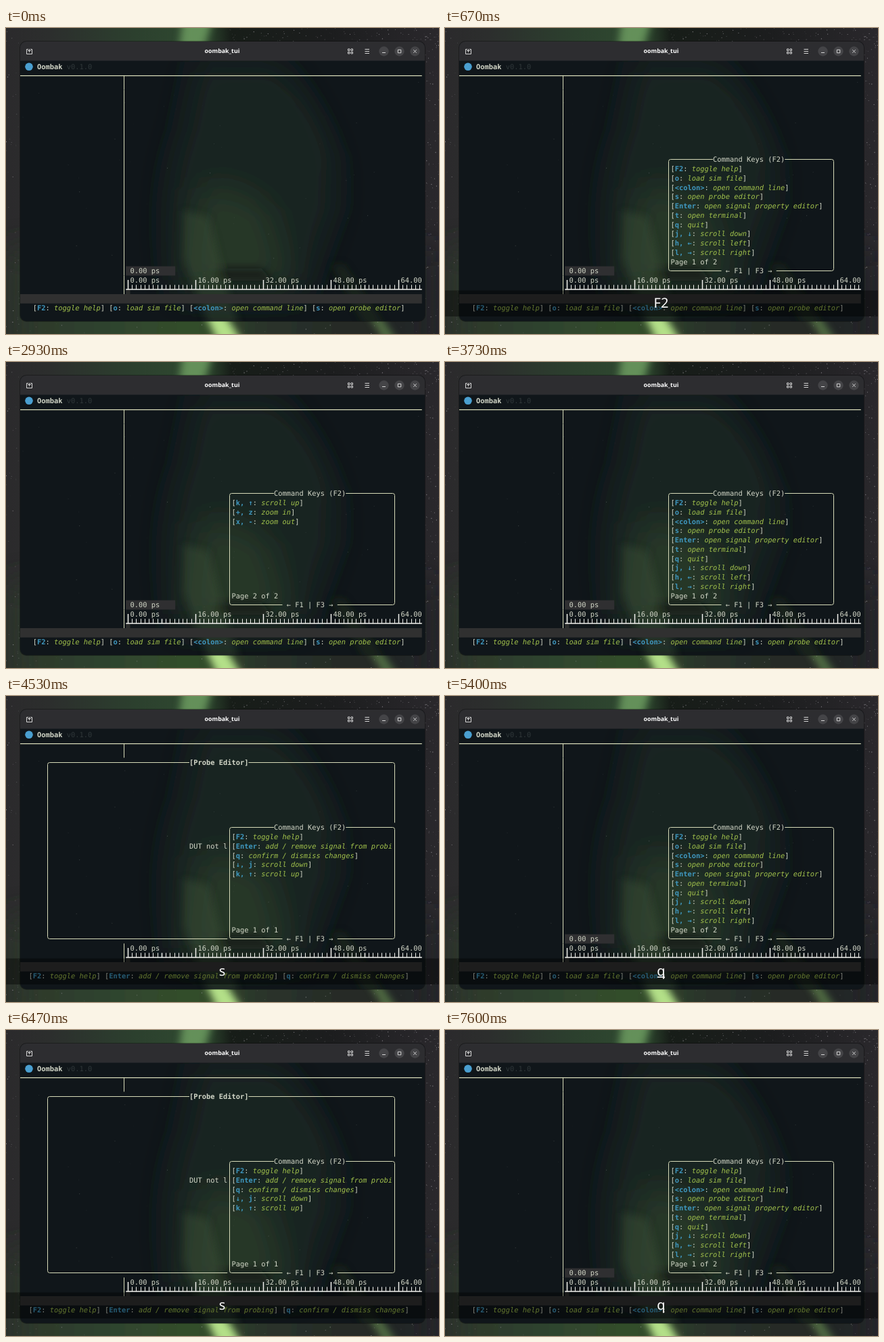
These frames come from a looping animation (640 px wide and 453 px high, 8000 ms). An HTML page:

```html
<!DOCTYPE html>
<html lang="en">
<head>
<meta charset="utf-8">
<title>Waveform viewer help</title>
<style>
html, body { margin: 0; width: 100%; height: 100%; overflow: hidden; background: #1a1c1c; }
svg { display: block; width: 640px; height: 453px; }
text { white-space: pre; text-rendering: geometricPrecision; }
.term text { font: 10.38px "DejaVu Sans Mono", "Noto Sans Mono", monospace; fill: #d3d7c8; }
.term .bold { font-weight: 700; }
.term .key { font-weight: 700; fill: #3f98c0; }
.term .desc { font-style: italic; fill: #a2c24c; }
.line { fill: none; stroke: #d6dab8; stroke-width: 1; }
.tick { fill: none; stroke: #f2f2ee; stroke-width: 1; }
.icon { fill: none; stroke: #d6d6d6; stroke-width: 1; }
.title { font: 700 8.8px "Open Sans", "Noto Sans", sans-serif; fill: #fff; text-anchor: middle; }
.press { font: 20px "Noto Sans", "Open Sans", sans-serif; fill: #fff; text-anchor: middle; }
</style>
</head>
<body>
<svg viewBox="0 0 640 453">
  <defs>
    <linearGradient id="sky">
      <stop offset="0" stop-color="#2b2a2c"/>
      <stop offset=".1" stop-color="#2c2e2d"/>
      <stop offset=".3" stop-color="#2c402e"/>
      <stop offset=".46" stop-color="#2f4a30"/>
      <stop offset=".52" stop-color="#171d18"/>
      <stop offset=".75" stop-color="#1c1d1e"/>
      <stop offset="1" stop-color="#2a282c"/>
    </linearGradient>
    <linearGradient id="ground">
      <stop offset="0" stop-color="#2c352c"/>
      <stop offset=".25" stop-color="#2f442d"/>
      <stop offset=".45" stop-color="#33502c"/>
      <stop offset=".58" stop-color="#2a332a"/>
      <stop offset="1" stop-color="#222325"/>
    </linearGradient>
    <filter id="soft" x="-50%" y="-50%" width="200%" height="200%"><feGaussianBlur stdDeviation="6"/></filter>
    <filter id="haze" x="-60%" y="-60%" width="220%" height="220%"><feGaussianBlur stdDeviation="24"/></filter>
    <clipPath id="frame"><rect x="21" y="20" width="598" height="414" rx="9"/></clipPath>
  </defs>

  <!-- night sky -->
  <rect width="640" height="453" fill="url(#sky)"/>
  <rect y="330" width="640" height="180" fill="url(#ground)" filter="url(#haze)"/>
  <path d="M262 -20H308L292 30H256Z" fill="#76a868" filter="url(#soft)" opacity=".75"/>
  <path d="M290 415H318L356 475H318Z" fill="#b4e088" filter="url(#soft)"/>
  <path d="M528 410L550 420 582 470H562Z" fill="#648a50" filter="url(#soft)" opacity=".7"/>
  <g id="stars" fill="#aaa6ac"></g>

  <!-- window -->
  <rect x="20" y="19" width="600" height="416" rx="10" fill="#000" opacity=".35"/>
  <g clip-path="url(#frame)">
    <rect x="21" y="20" width="598" height="414" fill="#10161a"/>
    <g filter="url(#haze)">
      <path d="M280 50H400Q480 130 490 260L440 400H250Q220 260 260 150Z" fill="#1b2922" opacity=".65"/>
      <path d="M285 240Q330 220 390 270L420 380H265Z" fill="#2b412b" opacity=".7"/>
      <path d="M400 90Q460 130 490 210L470 220Q440 140 390 110Z" fill="#22352a" opacity=".5"/>
    </g>
    <g filter="url(#soft)">
      <path d="M312 356H378L395 374H305Z" fill="#0d130f" opacity=".6"/>
      <path d="M262 270L300 280 325 380 345 440H300L262 340Z" fill="#42593c" opacity=".35"/>
      <path d="M480 350L530 440H560L500 350Z" fill="#2a3f27" opacity=".3"/>
    </g>
    <g id="dimStars" fill="#545a5a"></g>
    <rect x="21" y="20" width="598" height="28.5" fill="#2d2d30"/>
  </g>
  <text class="title" x="319.5" y="37.4">oombak_tui</text>
  <g class="icon">
    <path d="M33 31.5H30.5V38.5H38.5V31.5H36M34.5 31V36M32 33.5H37"/>
    <path d="M505.5 31h2.5v2.5h-2.5zM510 31h2.5v2.5h-2.5zM505.5 35.5h2.5v2.5h-2.5zM510 35.5h2.5v2.5h-2.5z"/>
    <path d="M530.5 31.5h6.5M530.5 34.5h6.5M530.5 37.5h6.5"/>
    <g fill="#444447" stroke="none">
      <circle cx="558.5" cy="34.5" r="7.2"/><circle cx="581.5" cy="34.5" r="7.2"/><circle cx="604.5" cy="34.5" r="7.2"/>
    </g>
    <path d="M556 36.5h5M579.3 32.3h4.5v4.5h-4.5zM602.3 32.3l4.4 4.4M606.7 32.3l-4.4 4.4"/>
  </g>

  <g class="term" id="term"></g>

  <!-- pressed key display -->
  <g id="band">
    <rect y="388.5" width="640" height="38.5" opacity=".4"/>
    <text class="press" id="press" x="319.5" y="414"></text>
    <rect id="under" y="415.4" height="1.5" fill="#fff"/>
  </g>
</svg>
<script>
const LOOP = 8000, COLS = 95, CELL = 6.25, ROW = 13.75;
const NS = "http://www.w3.org/2000/svg";
const $ = id => document.getElementById(id);
const crisp = v => Math.floor(v) + 0.5;
const colX = c => 21 + c * CELL;
const rowY = r => 57 + r * ROW;
const midX = c => crisp(colX(c) + CELL / 2);
const midY = r => crisp(rowY(r));

function add(parent, tag, attrs = {}, content) {
  const el = document.createElementNS(NS, tag);
  for (const k in attrs) el.setAttribute(k, attrs[k]);
  if (content !== undefined) el.textContent = content;
  parent.append(el);
  return el;
}
const group = () => add($("term"), "g");
const put = (g, col, row, str, cls = "") =>
  add(g, "text", { x: colX(col), y: rowY(row) + 3.8, class: cls }, str);
const stroke = (g, d, cls = "line", width) =>
  add(g, "path", { d, class: cls, ...(width && { style: `stroke-width:${width}` }) });
const fill = (g, x, y, width, height, color) => add(g, "rect", { x, y, width, height, fill: color });

// Each command is "key: description"; the row is cut after `max` characters.
function putCommands(g, col, row, list, max = COLS) {
  const line = put(g, col, row, "");
  let left = max;
  const part = (str, cls) => {
    const cut = str.slice(0, left);
    left -= cut.length;
    if (cut) add(line, "tspan", { class: cls }, cut);
  };
  list.forEach((cmd, i) => {
    const [key, desc] = cmd.split(": ");
    part(i ? " [" : "[", "");
    part(key, "key");
    part(": ", "");
    part(desc, "desc");
    part("]", "");
  });
}

function sprinkle(g, count, seed, place) {
  const rnd = () => (seed = (seed * 16807) % 2147483647) / 2147483647;
  for (let i = 0; i < count; i++) {
    const [x, y] = place(rnd);
    add(g, "circle", { cx: x.toFixed(1), cy: y.toFixed(1), r: (0.3 + rnd() * 0.4).toFixed(2), opacity: (0.2 + rnd() * 0.6).toFixed(2) });
  }
}
sprinkle($("stars"), 90, 77, r => [330 + r() * 310, r() * 20]);
sprinkle($("stars"), 100, 5, r => [620 + r() * 20, r() * 453]);
sprinkle($("stars"), 40, 19, r => [r() * 20, r() * 453]);
sprinkle($("stars"), 30, 41, r => [r() * 640, 435 + r() * 18]);
sprinkle($("dimStars"), 45, 9, r => [25 + r() * 590, 75 + r() * 310]);

// Parts that always show
const base = group();
const end = colX(COLS), wall = midX(24);
add(base, "circle", { cx: 34, cy: 57.3, r: 5.8, fill: "#4a9fd0" });
put(base, 4, 0, "Oombak", "bold");
put(base, 11, 0, "v0.1.0").style.fill = "#30383a";
stroke(base, `M21 70.6H${end}`, "line", 1.4);
stroke(base, `M${wall} 71V91.4M${wall} 366.4V394`);
fill(base, colX(25), 387, CELL, 7, "#2b2d2c");
fill(base, 21, 394, end - 21, 13.8, "#303030");
stroke(base, `M${colX(25)} 387H${end}`, "tick", 1.4);
for (let c = 25; c < COLS; c++) {
  const step = (c - 25) % 16, x = midX(c);
  stroke(base, `M${x} ${step ? 380.3 : 373}V387`, "tick", step % 8 ? 1 : 1.5);
  if (!step) put(base, c + 1, 23, ((c - 25).toFixed(2) + " ps").slice(0, COLS - c - 1));
}

// Main view
const main = group();
stroke(main, `M${wall} 91.4V366.4`);
fill(main, colX(25), 352.7, 73, 13.8, "#2f2f31");
put(main, 26, 22, "0.00 ps");
const mainKeys = [
  "F2: toggle help", "o: load sim file", "<colon>: open command line", "s: open probe editor",
  "Enter: open signal property editor", "t: open terminal", "q: quit",
  "j, ↓: scroll down", "h, ←: scroll left", "l, →: scroll right",
  "k, ↑: scroll up", "+, z: zoom in", "x, -: zoom out"
];
putCommands(main, 3, 26, mainKeys.slice(0, 4));

// Probe editor, partly behind the help box
const probe = group();
const probeKeys = [
  "F2: toggle help", "Enter: add / remove signal from probing", "q: confirm / dismiss changes",
  "↓, j: scroll down", "k, ↑: scroll up"
];
const top3 = midY(3), low = midY(22), pl = midX(6), right = midX(88);
stroke(probe, `M${colX(40)} ${top3}H${pl + 3}q-3 0 -3 3V${low - 3}q0 3 3 3H${colX(49)}` +
  `M${colX(54)} ${top3}H${right - 3}q3 0 3 3V187.6`);
put(probe, 40, 3, "[Probe Editor]", "bold");
put(probe, 40, 12, "DUT not l");
putCommands(probe, 2, 26, probeKeys.slice(0, 3));

// Help box
const help = group();
const ht = midY(10), hl = midX(49);
stroke(help, `M${colX(60)} ${ht}H${hl + 3}q-3 0 -3 3V${low - 3}q0 3 3 3H${colX(62)}` +
  `M${colX(77)} ${ht}H${right - 3}q3 0 3 3V${low - 3}q0 3 -3 3H${colX(75)}`);
put(help, 60, 10, "Command Keys (F2)");
put(help, 63, 22, "← F1 | F3 →");

function helpPage(keys, label) {
  const g = group();
  keys.forEach((k, i) => putCommands(g, 50, 11 + i, [k], 38));
  put(g, 50, 21, label);
  return g;
}
const pages = {
  first: helpPage(mainKeys.slice(0, 10), "Page 1 of 2"),
  second: helpPage(mainKeys.slice(10), "Page 2 of 2"),
  probe: helpPage(probeKeys, "Page 1 of 1")
};

// Screens and key presses, by start time in ms
const screens = [[0, ""], [470, "first"], [2130, "second"], [3000, "first"], [4330, "probe"],
  [5400, "first"], [6270, "probe"], [7400, "first"]];
const presses = [[530, "F2"], [2130, "F3"], [3000, "F1"], [4330, "s"], [5400, "q"], [6330, "s"], [7400, "q"]];
const HOLD = 140, SHOW = 670;
const latest = (list, t) => list.filter(e => e[0] <= t).pop();
const show = (el, on) => { el.style.display = on ? "" : "none"; };

function draw() {
  const t = performance.now() % LOOP;
  const page = latest(screens, t)[1];
  for (const name in pages) show(pages[name], name === page);
  show(help, page);
  show(probe, page === "probe");
  show(main, page !== "probe");

  const hit = latest(presses, t);
  const age = hit ? t - hit[0] : Infinity;
  show($("band"), age < SHOW);
  show($("under"), age < HOLD);
  if (age < SHOW) {
    const w = hit[1].length * 11;
    $("press").textContent = hit[1];
    $("under").setAttribute("x", 319.5 - w / 2);
    $("under").setAttribute("width", w);
  }
  requestAnimationFrame(draw);
}
draw();
</script>
</body>
</html>
```
